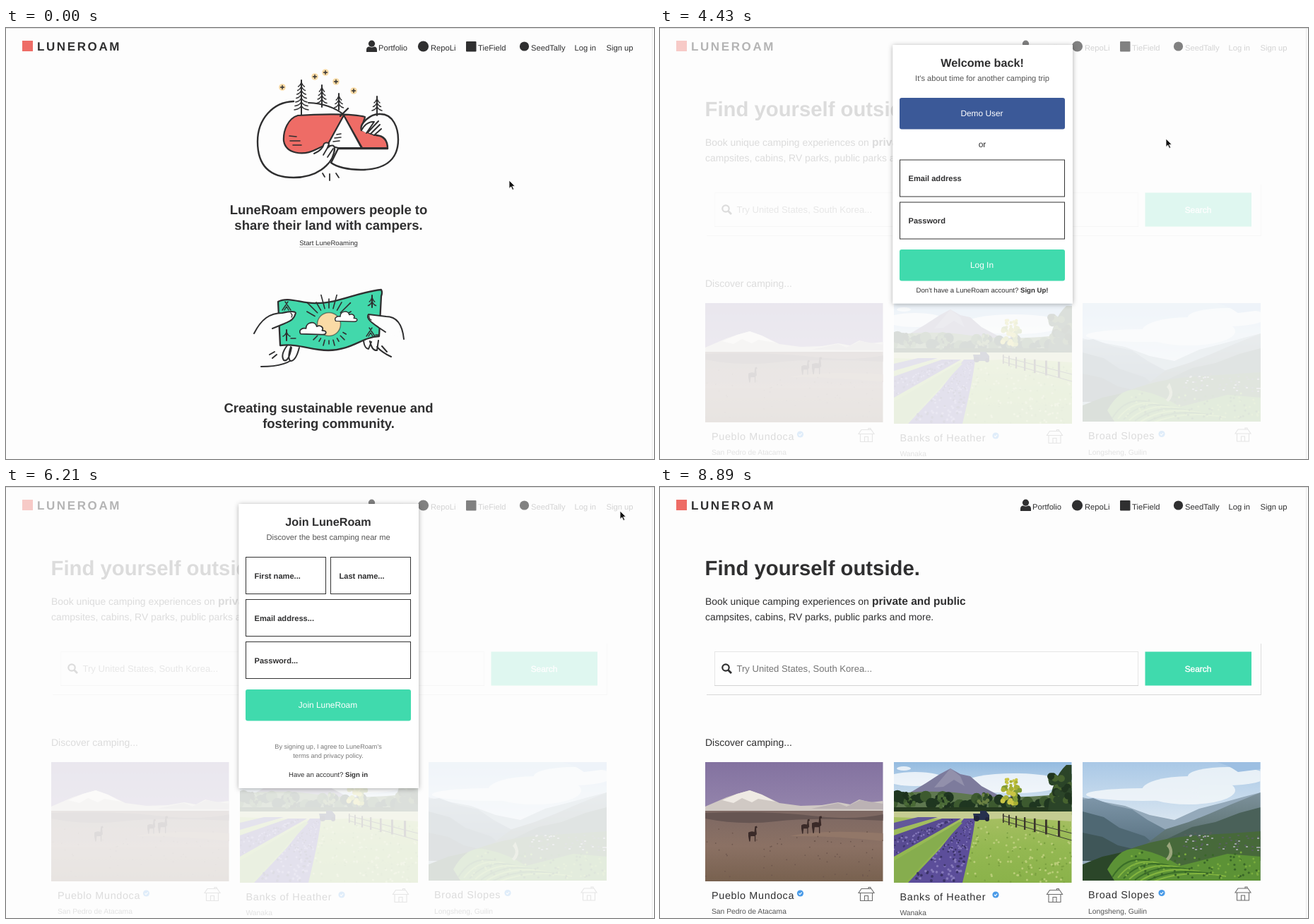
Write an HTML page that moves like this. It is 917 px wide and 611 px high and loops after 9160 ms.

```html
<!DOCTYPE html>
<html lang="en">
<head>
<meta charset="utf-8">
<title>LuneRoam</title>
<style>
html, body { margin: 0; width: 100%; height: 100%; overflow: hidden; background: #fdfdfd; }
#stage {
  display: block; width: 917px; height: 611px; text-rendering: geometricPrecision;
  font-family: "Liberation Sans", Arial, sans-serif;
}
</style>
</head>
<body>
<svg id="stage" viewBox="0 0 917 611" xmlns="http://www.w3.org/2000/svg"></svg>
<script>
const INK = '#2f2f30', MINT = '#40daad', RED = '#ee6c66', SAND = '#fadba6';
const LOOP = 9160;

// ---------- helpers ----------
const text = (x, y, size, str, extra = '') =>
  `<text x="${x}" y="${y}" font-size="${size}" fill="${INK}" ${extra}>${str}</text>`;
const bold = (x, y, size, str, extra = '') => text(x, y, size, str, 'font-weight="700" ' + extra);
const MID = 'text-anchor="middle" ';
const fill = color => `style="fill:${color}" `;
const rect = (x, y, w, h, color, extra = '') =>
  `<rect x="${x}" y="${y}" width="${w}" height="${h}" fill="${color}" ${extra}/>`;
const circle = (x, y, r, color, extra = '') =>
  `<circle cx="${x}" cy="${y}" r="${r}" fill="${color}" ${extra}/>`;
const shape = (d, color, extra = '') => `<path d="${d}" fill="${color}" ${extra}/>`;
const pen = (d, width = 2, color = 'none') =>
  `<path d="${d}" fill="${color}" stroke="${INK}" stroke-width="${width}" stroke-linecap="round" stroke-linejoin="round"/>`;
const many = (n, make) => Array.from({ length: n }, (_, i) => make(i)).join('');
const group = (id, body) => `<g id="${id}">${body}</g>`;
const gradient = (id, ...colors) => `<linearGradient id="${id}" x1="0" y1="0" x2="0" y2="1">` +
  colors.map((c, i) => `<stop offset="${i / (colors.length - 1)}" stop-color="${c}"/>`).join('') + '</linearGradient>';

let seed = 7;
const rnd = (a = 0, b = 1) => {
  seed = (seed * 16807) % 2147483647;
  return a + (b - a) * seed / 2147483647;
};

// ---------- header ----------
const logo = group('logo',
  rect(23, 18, 15, 15, RED) + bold(44, 32, 17, 'LUNEROAM', 'letter-spacing="2.6"'));
const navIcons = group('navIcons',
  circle(517.5, 22.2, 4.6, INK) +
  shape('M510 34V31Q510 26.500 514 26.500Q517.500 28.500 521 26.500Q525 26.500 525 31V34Z', INK) +
  circle(590.5, 26, 7.6, INK) + rect(651, 19, 14.5, 14.5, INK, 'rx="1"') + circle(733.5, 26, 6.6, INK));
const navText = group('navText',
  [[527, 'Portfolio'], [601, 'RepoLi'], [668, 'TieField'], [743, 'SeedTally'], [804.5, 'Log in'], [849.5, 'Sign up']]
    .map(([x, s]) => text(x, 32, 11.2, s)).join(''));

// ---------- landing page ----------
function pine(x, top, bottom, spread) {
  const rows = Math.round((bottom - top - 8) / 6);
  return pen(`M${x} ${top}V${bottom}`, 2) + many(rows, i => {
    const y = top + 5 + i * 5.5, w = spread * (0.35 + 0.65 * (i + 1) / rows);
    return pen(`M${x - w} ${y + 4}Q${x - 2} ${y + 3} ${x} ${y - 2}Q${x + 2} ${y + 3} ${x + w} ${y + 4}`, 1.5);
  });
}
const star = (x, y) => circle(x, y, 4.8, SAND) + pen(`M${x - 2.5} ${y}h5M${x} ${y - 2.5}v5`, 1.4);

const hug =
  [[391, 84], [437, 69], [452, 63], [467, 76], [492, 89]].map(p => star(...p)).join('') +
  pen('M407 104C377 105 356 130 356 161C356 196 374 212 407 212C438 212 461 196 465 172', 2.4, '#fdfdfd') +
  pen('M428 106C450 107 466 113 478 123', 2) +
  pen('M413 124C399 128 392 146 393 160C396 178 420 182 439 172L456 164L478 124L504 170H540C541 158 534 152 522 152L504 145C502 137 508 130 508 126C490 121 440 122 413 124Z', 2.2, RED) +
  pen('M478 124L455 166L470 170H503Z', 2, '#fdfdfd') + pen('M473 125L484 114', 2.4) +
  pen('M468 151L474 150M465 156L474 155M463 161L472 160', 1.6) +
  pen('M401 153L411 154M402 160L416 160M406 166L418 166', 1.6) +
  pen('M503 145C500 136 515 121 530 122C548 122 555 142 555 158C555 190 532 201 502 201C484 201 468 197 460 191L470 171H540C540 160 535 153 524 152', 2.4, '#fdfdfd') +
  pen('M503 145Q510 132 521 133L510 149M512 148L527 132M516 150L529 137M521 152L531 143', 2, '#fdfdfd') +
  pen('M436 178Q448 173 450 164Q454 161 457 164L455 170L459 167Q464 165 465 170Q464 186 452 196', 2, '#fdfdfd') +
  pen('M449 180L456 168M455 183L463 171', 1.8) +
  pine(418, 74, 123, 10) + pine(447, 81, 112, 7) + pine(471, 93, 116, 6.5) + pine(525, 97, 124, 7) +
  pen('M448 206L451 211M458 207V216M467 206L471 212', 1.8);

const tent = (x, y) => pen(`M${x - 6} ${y + 5}L${x + 2} ${y - 7}M${x - 2} ${y - 7}L${x + 6} ${y + 5}ZM${x - 3} ${y + 5}L${x} ${y}L${x + 3} ${y + 5}`, 1.4);
const cloud = (x, y, k) =>
  `<g transform="translate(${x} ${y}) scale(${k})">${pen('M-18 8C-22 1 -14 -1 -10 0C-10 -10 4 -12 6 -3C12 -6 17 -1 14 3C22 3 21 9 15 9Z', 1.8, '#fff')}</g>`;
const rays = many(24, i => {
  const a = i * Math.PI / 12, c = Math.cos(a), s = Math.sin(a);
  const near = 23, far = s < -0.3 ? 36 + 7 * (i % 2) : 28 + 3 * (i % 2);
  return Math.abs(s) < 0.3 ? '' :
    pen(`M${457 + near * c} ${420 + near * s}L${457 + far * c} ${420 + far * s}`, 1.6);
});
const bill =
  pen('M361 480C383 480 402 476 410 465M373 463L380 459M377 468L383 463', 2) +
  pen('M398 450Q388 463 393 471Q400 474 404 453M403 452Q398 466 402 472Q410 473 415 453', 2, '#fdfdfd') +
  pen('M506 443Q507 454 513 455L517 445M515 444Q518 458 525 457L527 443M525 452Q532 460 545 466M532 451L539 459', 2, '#fdfdfd') +
  pen('M385 388C399 380 419 391 439 390C472 390 498 374 531 371Q533 375 531 380L528 437C504 438 489 457 456 457C430 457 416 447 388 450Z', 2.3, '#42d8ab') +
  rays + circle(457, 420, 16.5, SAND, `stroke="${INK}" stroke-width="1.5" stroke-opacity=".55"`) +
  cloud(434, 426, 0.95) + cloud(481, 409, 0.8) +
  tent(397, 395) + tent(516, 432) + pine(397, 428, 443, 5) + pine(518, 379, 396, 5.5) +
  pen('M403 440h7M523 435h5', 1.4) +
  pen('M351 433C361 413 373 404 391 404Q408 400 410 404C407 415 400 416 394 419L377 426', 2, '#fdfdfd') +
  pen('M563 441C561 421 553 409 538 409L513 406C508 412 521 420 528 425L537 431', 2, '#fdfdfd') +
  pen('M403 404Q406 407 404 410M514 408Q513 412 517 414', 1.3);

const landing = group('landing', hug + bill +
  bold(456.5, 264, 18.5, 'LuneRoam empowers people to', MID) +
  bold(456.5, 285.5, 18.5, 'share their land with campers.', MID) +
  text(456.5, 308, 9.6, 'Start LuneRoaming', MID) + rect(415, 310, 83, 1, '#d2d2d2') +
  bold(456.5, 545, 18.5, 'Creating sustainable revenue and', MID) +
  bold(456.5, 566.5, 18.5, 'fostering community.', MID));

// ---------- photos ----------
const photo = (x, h, body) => `<svg x="${x}" y="390" width="251.500" height="${h}" overflow="hidden">${body}</svg>`;
const speckles = (n, x0, x1, y0, y1, color, r = 1.2) =>
  many(n, () => circle(rnd(x0, x1).toFixed(1), rnd(y0, y1).toFixed(1), r, color));
const llama = (x, y, k) => `<g transform="translate(${x} ${y}) scale(${k})">` +
  shape('M0 8Q5 5 10 7L11 -2L14 -3L15 0L13 1L14 11L12 13V23H10.500V14H4L3 23H1.500L0 14Z', '#3a2a28') + '</g>';

const desert = photo(64, 169,
  rect(0, 0, 252, 80, 'url(#dusk)') +
  shape('M0 63L30 50L45 45L63 40L80 46L105 58L135 62L165 61L188 57L205 60L218 53L234 57L252 55V74H0Z', '#d0c9c4') +
  shape('M24 54L45 45L63 40L80 46L99 56L75 52L66 57L52 51L40 58Z', '#efeae4') +
  shape('M150 66L188 58L200 63L219 54L252 59V67Z', '#bbb2b4') +
  rect(0, 69, 252, 100, 'url(#dirt)') +
  shape('M0 72Q90 69 150 76T252 74V83Q150 78 100 84T0 80Z', '#665552') +
  shape('M120 105Q160 95 252 101V112Q180 104 120 105Z', '#927768') +
  speckles(60, 0, 252, 95, 168, '#6e574e', 0.9) +
  llama(61, 93, 0.85) + llama(136, 83, 0.8) + llama(151, 79, 0.95));

const leafy = (x, y, r, ...colors) =>
  many(Math.round(r * 2), i => circle((x + rnd(-r, r)).toFixed(1), (y + rnd(-r, r)).toFixed(1), (r * 0.28).toFixed(1), colors[i % colors.length]));
const lavender = photo(331, 171,
  rect(0, 0, 252, 80, 'url(#noon)') +
  '<g fill="#fff" opacity=".75"><ellipse cx="30" cy="24" rx="42" ry="10"/><ellipse cx="170" cy="30" rx="70" ry="14"/><ellipse cx="14" cy="9" rx="10" ry="3"/></g>' +
  shape('M15 48L45 30L65 17L80 9L94 17L108 20L124 34L150 48V60H15Z', '#7d7b9c') +
  shape('M80 9L94 20L100 34L85 25L70 35L57 36Z', '#9290ab') +
  shape('M0 45Q60 38 110 46T252 44V75H0Z', '#5f7850') +
  many(32, i => circle(i * 8 - 3, 58 + rnd(-10, 5), rnd(5, 9), i % 3 ? '#1f3620' : '#3d5a2f')) +
  rect(0, 64, 252, 6, '#24391f') +
  shape('M218 68Q224 22 244 4H252V70Z', '#2b4428') + leafy(240, 38, 18, '#20351f', '#47632f', '#2b4428') +
  leafy(20, 52, 9, '#1c301d', '#4a6a36') + leafy(70, 56, 9, '#1c301d', '#4a6a36') + leafy(125, 54, 9, '#314d28', '#6a8042') +
  pen('M166 72V32', 1.3) + leafy(166, 32, 8, '#c9c544', '#a8b033') + leafy(166, 47, 12, '#c9c544', '#a8b033', '#7f9a35') +
  rect(0, 70, 252, 102, 'url(#meadow)') + shape('M0 70H252V84L175 79L110 82L0 78Z', '#c5cc92') +
  speckles(90, 100, 252, 90, 171, '#b9cd78', 1.5) + speckles(70, 90, 252, 90, 171, '#7ca241', 1.3) +
  shape('M0 86L34 78L62 78L0 96Z', '#62589a') + shape('M0 104L68 80L95 80L0 134Z', '#584b92') +
  shape('M99 80L115 80C112 107 104 142 97 171H20L66 122Z', '#5c4e9a') +
  shape('M0 140L92 85L97 86L16 171H0Z', '#86ad4e') +
  many(140, () => {
    const p = rnd(), x = 108 - 50 * p + rnd(-1, 1) * (4 + 33 * p);
    return circle(x.toFixed(1), (84 + 86 * p).toFixed(1), (0.7 + 1.3 * p).toFixed(1), rnd() > 0.5 ? '#8579ba' : '#3b3367');
  }) +
  many(70, () => {
    const p = rnd();
    return circle((82 * p).toFixed(1), (132 - 50 * p - rnd(0, 24) * (1 - p)).toFixed(1), 1.3, rnd() > 0.5 ? '#8478ba' : '#3f3770');
  }) +
  shape('M112 73H122V69H130L135 75V82H114Z', '#26304e') + circle(117, 80, 4, '#20243a') + circle(132, 81, 3, '#20243a') +
  pen('M154 76L252 101M154 83L252 111', 0.9) +
  many(8, i => rect(154 + i * i + i * 7, 73 + i * 1.7, 1.6 + i * 0.25, 13 + i * 1.6, '#3b352c')));

const terrace = photo(598, 168,
  rect(0, 0, 252, 110, 'url(#haze)') +
  '<g fill="#f6f9fb" opacity=".8"><ellipse cx="150" cy="40" rx="66" ry="20"/><ellipse cx="205" cy="20" rx="56" ry="13"/><ellipse cx="85" cy="46" rx="80" ry="9"/></g>' +
  shape('M190 0H252V10L220 14Q206 4 190 0Z', '#9dbfe2') +
  shape('M0 50L22 55L60 62L95 75L130 82L165 66L200 57L225 50L252 43V168H0Z', '#94a9ba') +
  shape('M0 53L15 51L42 61L70 67L92 82L118 96L130 130H0Z', 'url(#slope)') +
  shape('M0 70L30 78L52 93L88 105L108 122L80 140H0Z', '#4f6873') +
  shape('M0 100L28 106L50 118L76 124L40 140H0Z', '#3f5658') +
  shape('M90 116L118 95L150 85L180 73L210 60L252 43V140H90Z', 'url(#ridge)') +
  shape('M100 118L155 92L188 85L222 72L252 64V140H100Z', '#4a6159') +
  shape('M0 152Q30 135 65 124Q110 107 160 104T252 98V168H0Z', '#47693a') +
  shape('M0 145L28 134L55 128L43 147L60 168H0Z', '#2b4629') +
  shape('M35 152Q55 117 82 124Q112 130 138 147L205 130L252 134V168H45Z', '#5c9236') +
  many(8, i => `<path d="M${42 + i * 8} ${163 + i}Q${67 + i * 11} ${123 + i * 4} ${112 + i * 13} ${148 + i * 2}" fill="none" stroke="${i % 2 ? '#83b53f' : '#3b6f28'}" stroke-width="2"/>`) +
  shape('M118 137Q127 127 119 119L123 113L126 121Q130 132 121 140Z', '#9aa67c') +
  many(60, () => rect(rnd(140, 250).toFixed(0), rnd(99, 124).toFixed(0), 3, 2, rnd() > 0.5 ? '#98a09f' : '#55605a')) +
  speckles(50, 60, 250, 125, 165, '#396628', 1.6) + speckles(40, 60, 250, 128, 165, '#7aad3e', 1.5));

// ---------- search page ----------
const badge = (x, y) => circle(x, y, 4.6, '#4a9be8') +
  `<path d="M${x - 2} ${y}l1.500 1.600l2.700 -3" fill="none" stroke="#fff" stroke-width="1.1"/>`;
const hut = (x, y) => `<path transform="translate(${x} ${y})" d="M4 1H18L22 7H0ZM2.500 7V18H19.500V7M8.500 18V11H13.500V18M14 1V-1H17V1" fill="none" stroke="#6d6d6d" stroke-width="1.1"/>`;
const card = (x, y, title, place, badgeX) =>
  text(x, y, 14.4, title, 'letter-spacing=".65"') + badge(badgeX, y - 7.5) + hut(x + 208, y - 15) +
  text(x, y + 21.5, 10.3, place, fill('#555'));

const home = group('home',
  bold(63.5, 125, 29.3, 'Find yourself outside.') +
  text(64, 166.5, 13.9, 'Book unique camping experiences on') + bold(300, 166.5, 15.5, 'private and public') +
  text(64, 188.5, 13.9, 'campsites, cabins, RV parks, public parks and more.') +
  rect(66, 294, 785, 1, '#d9d9d9') + rect(850, 222, 1, 73, '#dedede') +
  rect(77.5, 233.5, 599, 48, '#fefefe', 'stroke="#e6e6e6"') + rect(77, 281, 600, 1, '#d3d3d3') +
  `<circle cx="93" cy="256" r="4.700" fill="none" stroke="${INK}" stroke-width="2.200"/><path d="M96.500 259.500L101 264" stroke="${INK}" stroke-width="2.800"/>` +
  text(108.5, 261.5, 13.1, 'Try United States, South Korea...', fill('#757575')) +
  rect(686.5, 233.5, 150.5, 48, MINT) + text(761.5, 261.5, 11.9, 'Search', MID + fill('#fff') + 'stroke="#fff" stroke-width=".4"') +
  text(64, 367, 14, 'Discover camping...') +
  desert + lavender + terrace +
  card(73, 583.5, 'Pueblo Mundoca', 'San Pedro de Atacama', 198.5) +
  card(339.5, 585.5, 'Banks of Heather', 'Wanaka', 475) +
  card(606, 583, 'Broad Slopes', 'Longsheng, Guilin', 710));

// ---------- dialogs ----------
const field = (x, y, w, label) =>
  rect(x + 0.5, y + 0.5, w - 1, 52, '#fff', 'stroke="#333"') + bold(x + 12.5, y + 30.5, 11.1, label);
const button = (y, color, label) =>
  rect(339, y, 234, 44.5, color, 'rx="3"') + text(455.5, y + 26, 11.9, label, MID + fill('#fff'));
const dialog = (id, h, title, sub, body) => group(id,
  rect(329.5, 24, 254.5, h, '#fff', 'filter="url(#shadow)"') +
  bold(456, 55, 16.2, title, MID) + text(456, 75, 11.15, sub, MID + fill('#555')) + body);
const footer = (y, ask, link) => text(456, y, 9.6, `${ask} <tspan font-weight="700">${link}</tspan>`, MID);

const login = dialog('login', 366.5, 'Welcome back!', "It's about time for another camping trip",
  button(99, '#3b5998', 'Demo User') + text(456, 168.5, 12, 'or', MID) +
  field(339, 186.5, 234, 'Email address') + field(339, 246.5, 234, 'Password') +
  button(314, MINT, 'Log In') + footer(375, "Don't have a LuneRoam account?", 'Sign Up!'));
const signup = dialog('signup', 403, 'Join LuneRoam', 'Discover the best camping near me',
  field(339, 99, 114, 'First name...') + field(459, 99, 114, 'Last name...') +
  field(339, 159, 234, 'Email address...') + field(339, 219, 234, 'Password...') +
  button(287, MINT, 'Join LuneRoam') +
  text(456, 370.5, 9.1, "By signing up, I agree to LuneRoam's", MID + fill('#777')) +
  text(456, 384, 9.1, 'terms and privacy policy.', MID + fill('#777')) +
  footer(411, 'Have an account?', 'Sign in'));

// ---------- pointer ----------
const pointer = group('pointer',
  '<path id="arrow" d="M0 0V11.500L2.700 9L4.700 13.500L6.700 12.600L4.700 8.300H8.300Z" fill="#111" stroke="#fff" stroke-width=".8"/>' +
  '<path id="hand" d="M-1 8.500V1Q0 -.5 1.300 1V5.500Q3 4.500 3.800 6Q5.500 5.200 6 6.700Q7.500 6 7.800 8L7 11.500V13H0L-4 8Q-3.500 6 -1 8.500ZM2 8.500V11M4.300 8.500V11" fill="#fff" stroke="#111" stroke-width="1"/>');

document.getElementById('stage').innerHTML =
  '<defs><filter id="shadow" x="-10%" y="-10%" width="120%" height="120%"><feDropShadow dx="0" dy="1" stdDeviation="3.500" flood-opacity=".32"/></filter>' +
  gradient('dusk', '#8372a0', '#9788ae') + gradient('dirt', '#7d6863', '#8b7164', '#78614f') +
  gradient('noon', '#94bbe0', '#eef3f6') + gradient('meadow', '#a9c064', '#94b852', '#8ab24a') +
  gradient('haze', '#a9c8e6', '#e8eff4') + gradient('slope', '#7d95a8', '#546d7b') +
  gradient('ridge', '#7d919c', '#4a6159') + '</defs>' +
  rect(0, 0, 917, 611, '#fdfdfd') + rect(0, 0, 917, 1, '#dcdcdc') + rect(914, 1, 1, 610, '#e9e9e9') +
  landing + home + logo + navIcons + navText +
  `<rect id="underline" y="35.500" height="1.700" fill="${MINT}"/>` + login + signup + pointer;

// ---------- motion ----------
const smooth = u => u * u * (3 - 2 * u);
// first change, last change, steps, start, bend, end, easing
const moves = [
  [140, 1170, 8, [712, 216], [738, 196], [763, 175], u => u],
  [1320, 2210, 7, [763, 175], [798, 105], [811, 33], u => Math.sin(u * Math.PI / 2)],
  [3550, 4430, 7, [811, 32], [901, 90], [716, 157], smooth],
  [4880, 5610, 6, [716, 157], [800, 105], [869, 34], smooth],
  [6650, 7550, 7, [869, 34], [783, 235], [861, 434], smooth],
  [8150, 8890, 6, [861, 434], [875, 520], [926, 622], u => u * u],
];

function pointerAt(t) {
  let spot = moves[0][3];
  for (const [from, to, steps, a, b, c, ease] of moves) {
    if (t < from) break;
    const step = Math.min(steps, 1 + Math.floor((t - from) / (to - from) * (steps - 1) + 1e-6));
    const u = ease(step / steps), v = 1 - u;
    spot = a.map((p, i) => v * v * p + 2 * u * v * b[i] + u * u * c[i]);
  }
  return spot;
}

const el = id => document.getElementById(id);
const show = (id, on) => el(id).setAttribute('display', on ? 'inline' : 'none');
const fade = (id, value) => el(id).setAttribute('opacity', value);

function draw(t) {
  const loginOpen = t >= 2660 && t < 4880, signupOpen = t >= 6210 && t < 8150;
  const covered = loginOpen || signupOpen;
  show('landing', t < 2660);
  show('home', t >= 2660);
  show('login', loginOpen);
  show('signup', signupOpen);
  fade('home', covered ? 0.16 : 1);
  fade('navText', covered ? 0.2 : 1);
  fade('navIcons', covered ? 0.6 : 1);
  fade('logo', covered ? 0.35 : 1);

  const [x, y] = pointerAt(t);
  const hover = !covered && y < 44 && x > 800;
  show('hand', hover);
  show('arrow', !hover);
  show('underline', hover);
  el('underline').setAttribute('x', x > 843 ? 847 : 801);
  el('underline').setAttribute('width', x > 843 ? 45 : 38);
  el('pointer').setAttribute('transform', `translate(${x.toFixed(1)} ${y.toFixed(1)})`);
}

const start = performance.now();
function tick() {
  draw((performance.now() - start) % LOOP);
  requestAnimationFrame(tick);
}
draw(0);
requestAnimationFrame(tick);
</script>
</body>
</html>
```
